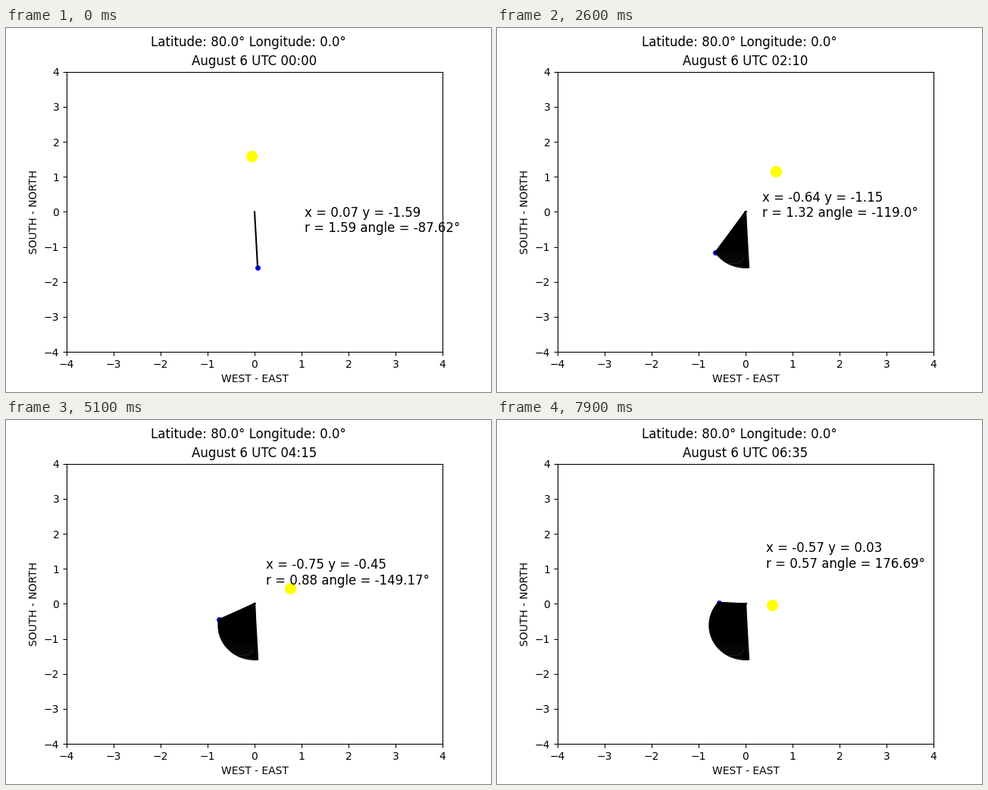
Animation of 640x480 px, one loop 8000 ms. Source, as a matplotlib script:

```python
import numpy as np
import matplotlib.pyplot as plt
from matplotlib.animation import FuncAnimation

FRAMES, INTERVAL, STEP_MIN = 80, 100, 5
LAT, DEC = np.radians(80.06), np.radians(16.235)
START_HOUR_ANGLE = -2.465   # degrees past local midnight at 00:00 UTC
GNOMON = 0.1754


def shadow(i):
    """Tip of the gnomon's shadow (east, north) at step i."""
    h = np.radians(START_HOUR_ANGLE + i * STEP_MIN / 4)
    east = np.cos(DEC) * np.sin(h)
    north = np.cos(LAT) * np.sin(DEC) + np.sin(LAT) * np.cos(DEC) * np.cos(h)
    up = np.sin(LAT) * np.sin(DEC) - np.cos(LAT) * np.cos(DEC) * np.cos(h)
    return -GNOMON * east / up, -GNOMON * north / up


plt.rcParams["font.family"] = "DejaVu Sans"
fig, ax = plt.subplots(figsize=(6.4, 4.8), dpi=100)
fig.suptitle("Latitude: 80.0° Longitude: 0.0°")
ax.set(xlim=(-4, 4), ylim=(-4, 4), xlabel="WEST - EAST", ylabel="SOUTH - NORTH")
title = ax.set_title("")

sun, = ax.plot([], [], "o", color="yellow", markersize=10)
tip, = ax.plot([], [], "o", color="blue", markersize=4)
label = ax.text(0, 0, "", fontsize=12)

tips = [shadow(i) for i in range(FRAMES)]
rays = [ax.plot([0, x], [0, y], color="black", lw=1.5)[0] for x, y in tips]


def update(i):
    x, y = tips[i]
    for k, ray in enumerate(rays):
        ray.set_visible(k <= i)
    sun.set_data([-x], [-y])
    tip.set_data([x], [y])

    r, angle = np.hypot(x, y), np.degrees(np.arctan2(y, x))
    xs, ys, rs, angles = (round(float(v), 2) for v in (x, y, r, angle))
    label.set_position((x + 1, y + 1))
    label.set_text(f"x = {xs} y = {ys}\nr = {rs} angle = {angles}°")

    hour, minute = divmod(i * STEP_MIN, 60)
    title.set_text(f"August 6 UTC {hour:02d}:{minute:02d}")
    return [sun, tip, label, title, *rays]


anim = FuncAnimation(fig, update, frames=FRAMES, interval=INTERVAL,
                     repeat=True, repeat_delay=0, blit=False)
plt.show()
```
